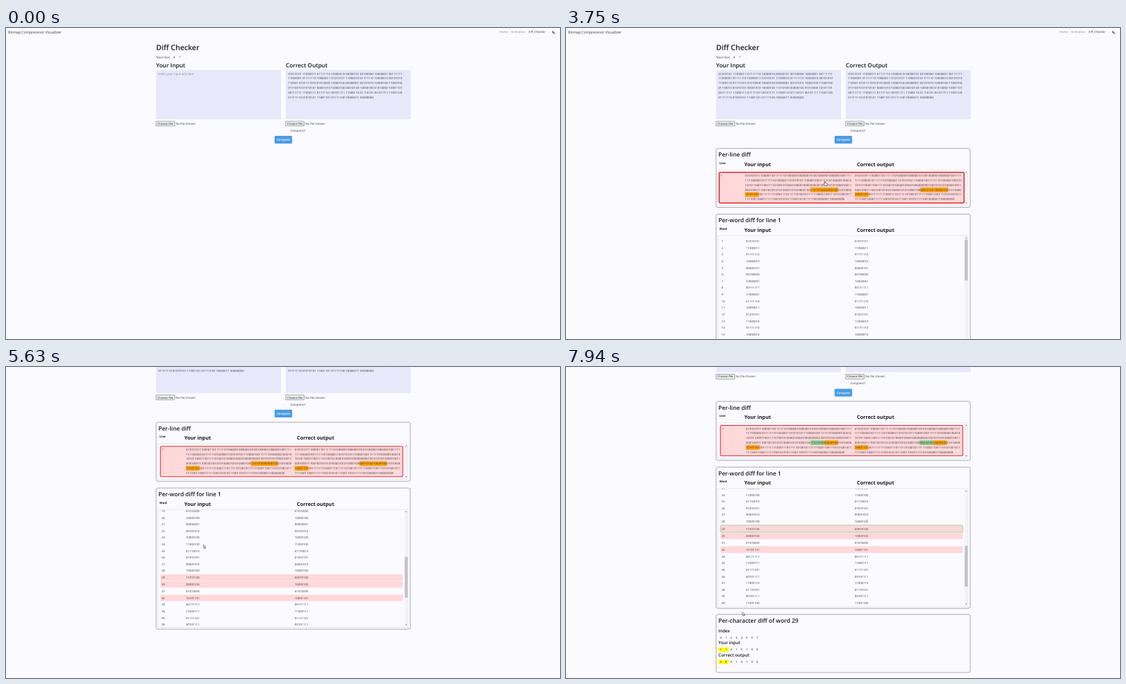
Write an HTML page that moves like this. It is 800 px wide and 450 px high and loops after 8000 ms.

```html
<!DOCTYPE html>
<html lang="en">
<head>
<meta charset="utf-8">
<title>Bitmap Compression Visualizer</title>
<style>
html, body { margin: 0; width: 100%; height: 100%; overflow: hidden; background: #fbfaff; }
svg { display: block; width: 100%; height: 100%; }
text { font-family: "Open Sans", "Noto Sans", sans-serif; text-rendering: geometricPrecision; white-space: pre; }
</style>
</head>
<body>
<pre id="bits" hidden>
01010101 11000011 01111110 10000010 00000101 00100000 10000001 00111111
11000001 01111110 10000011 01010101 11000010 01111110 10000010 00101010
11000110 01111010 01010000 10000100 00000001 00101010 10000100 11000100
01110010 01010101 00001010 10000100 00010100 10000100 01010000 10001101
00111111 11000111 01111101 00101111 11000110 01110101 00101111 11001100
01111110 01010101 11001101 01111100 10000011 00000000
</pre>
<svg id="stage" viewBox="0 0 800 450"></svg>
<script>
const LOOP = 8000;
const SMALL = 4.31;
const LEADING = 6.8;
const ROW = 9.62;
const DIGIT = 0.572 * SMALL;
const PER_LINE = 62;
const PICKED = 28;
const COLUMNS = [216.8, 404];
const CELLS = [259.8, 416.8];
const INK = '#18181d';
const PINK = '#ffd8da';
const ORANGE = '#ffa20c';

const correct = document.getElementById('bits').textContent.trim().split(/\s+/);
const edits = { 28: '11010100', 29: '00000100', 31: '10101101' };
const edited = Object.keys(edits).map(Number);
const input = correct.map((word, i) => edits[i] || word);
const sides = [input, correct];

// Text is placed by its left edge and the middle of its capitals.
const text = (x, mid, str, size = SMALL, { fill = '#3b3b42', weight = 400, anchor = 'start' } = {}) =>
  `<text x="${x}" y="${mid + size * 0.36}" font-size="${size}" fill="${fill}" font-weight="${weight}" text-anchor="${anchor}">${str}</text>`;
const rect = (x, y, w, h, fill, extra = '') =>
  `<rect x="${x}" y="${y}" width="${w}" height="${h}" fill="${fill}" ${extra}/>`;
const group = (id, body, extra = '') => `<g id="${id}" ${extra}>${body}</g>`;
const heading = (x, y, str, size) => text(x, y, str, size, { fill: INK, weight: 600 });
const bold = (x, y, str, size) => text(x, y, str, size, { fill: INK, weight: 700 });
const each = (list, draw) => [...list].map(draw).join('');
const stack = (x, y, lines) => each(lines, (line, i) => text(x, y + i * LEADING, line));

const paragraph = (x, words) => stack(x + 3.2, 66, words.join(' ').match(/.{1,71}(?: |$)/g));

const column = (x, title) =>
  heading(x, 53.8, title, 8.3) +
  rect(x, 60.6, 180.4, 71.4, '#e8e8fa') +
  rect(x, 135, 26.6, LEADING, '#efefef', 'stroke="#77777c" stroke-width=".6"') +
  text(x + 1.8, 138.4, 'Choose File', SMALL, { fill: '#222' }) +
  text(x + 28.3, 138.4, 'No file chosen');

const panel = (y, h, title) =>
  rect(216.8, y, 367, h, 'none', 'rx="2.6" stroke="#737378" stroke-width=".6"') +
  heading(220, y + 9, title, 8.4);

const arrowTick = (y, dir) => `<path d="M576.8 ${y}h2.4l-1.2 ${-1.5 * dir}z" fill="#77777c"/>`;

const tablePanel = (y, h, title, label) => {
  const top = y + 31, bodyHeight = h - 34;
  return panel(y, h, title) +
    bold(221.5, y + 21, label, 4.2) +
    bold(257.6, y + 22.8, 'Your input', 7.3) +
    bold(420, y + 22.8, 'Correct output', 7.3) +
    rect(219.8, top, 360.8, bodyHeight, 'none', 'stroke="#d6d6dc" stroke-width=".5"') +
    rect(575.5, top, 5, bodyHeight, '#f3f3f6') +
    arrowTick(top + 4, 1) + arrowTick(top + bodyHeight - 4, -1);
};

const mark = (x, i) => {
  const line = Math.floor(i * 8 / PER_LINE), start = i * 8 % PER_LINE;
  return rect(x + start * DIGIT, 210.3 + line * LEADING, 8 * DIGIT, LEADING, ORANGE,
    i === PICKED ? 'class="pickedMark"' : '');
};
const bitBlock = (x, words) =>
  each(edited, i => mark(x, i)) +
  stack(x, 213.6, words.join('').match(new RegExp(`.{1,${PER_LINE}}`, 'g')));

const rowTop = i => 303.7 + i * ROW + 0.3 * edited.filter(k => k < i).length;
const wordRow = i => {
  const mid = rowTop(i) + ROW / 2;
  const box = i in edits
    ? rect(223, mid - 4.65, 350, 9.3, PINK, `rx=".8" ${i === PICKED ? 'id="pickedBox"' : ''}`) : '';
  return box + text(224.5, mid, i + 1) + each(sides, (words, s) => text(CELLS[s], mid, words[i]));
};
const rows = (from, to) => each(correct, (_, i) => i >= from && i < to ? wordRow(i) : '');

const charSections = { 'Index': '01234567', 'Your input': input[PICKED], 'Correct output': correct[PICKED] };
const charSection = ([title, chars], n) => {
  const y = 506 + n * 17.7;
  return heading(220, y, title, 6.3) + each(chars, (c, i) => {
    const x = 223.6 + i * 7.5;
    const differs = n > 0 && input[PICKED][i] !== correct[PICKED][i];
    return (differs ? rect(x - 3.75, y + 6.6, 7.6, 6.4, '#ffff14') : '') +
      text(x, y + 9.8, c, 3.9, { anchor: 'middle', weight: 600 });
  });
};

const grey = { fill: '#85858c' };
const page =
  text(3, 6, 'Bitmap Compression Visualizer', 5.35) +
  text(712.8, 5.8, 'Home', SMALL, grey) +
  text(729.3, 5.8, 'Animation', SMALL, grey) +
  text(754.5, 5.8, 'Diff Checker') +
  '<path d="M790.8 3.4a2.3 2.3 0 1 0 2.7 3.2a2 2 0 0 1-2.7-3.2z" fill="#111"/>' +
  heading(216.8, 28, 'Diff Checker', 10.6) +
  text(216.8, 42, 'Word Size') + text(241.5, 42, '8') +
  '<path d="M249.9 41.3l1.3 1.2l1.3-1.2" fill="none" stroke="#444" stroke-width=".6"/>' +
  column(COLUMNS[0], 'Your Input') + column(COLUMNS[1], 'Correct Output') +
  group('focus', rect(216.6, 60.3, 180.8, 72, '#e6eafa', 'rx="1" stroke="#a9c8ee" stroke-width=".9"')) +
  group('hint', text(220, 66, 'Enter your input bits here', SMALL, grey)) +
  group('pasted', paragraph(COLUMNS[0], input)) + paragraph(COLUMNS[1], correct) +
  text(410.5, 148.3, 'Compress?') +
  rect(387.8, 156, 25.4, 11.2, '#4b9de3', 'rx="1.4"') +
  text(400.5, 161.8, 'Compare', SMALL, { fill: '#fff', weight: 600, anchor: 'middle' }) +
  group('linePanel',
    tablePanel(174.2, 85.4, 'Per-line diff', 'Line') +
    group('lineRow',
      rect(223, 209, 350, 44, PINK, 'rx="1.4" id="lineBox"') + text(225, 213.6, '1') +
      each(sides, (words, s) => bitBlock(CELLS[s], words)))) +
  group('wordPanel',
    tablePanel(269.4, 204.2, 'Per-word diff for line 1', 'Word') +
    rect(575.8, 306.3, 4.4, 59, '#c4c4c8', 'id="thumb"') +
    group('clipped', group('rows',
      rows(0, PICKED) + group('rowsAfter', rows(PICKED + 1, correct.length)) +
      group('pickedRow', rows(PICKED, PICKED + 1))), 'clip-path="url(#tableClip)"')) +
  group('charPanel',
    panel(482.5, 84, `Per-character diff of word ${PICKED + 1}`) +
    each(Object.entries(charSections), charSection));

const outline = 'fill="#fff" stroke="#222" stroke-width=".55" stroke-linejoin="round"';
const stage = document.getElementById('stage');
stage.innerHTML =
  `<defs><clipPath id="tableClip">${rect(220, 300.8, 355.4, 168.8, '#000')}</clipPath></defs>` +
  group('page', page) +
  group('cursor',
    `<path id="arrow" d="M0 0v5l1.2-1l.8 1.8l.9-.4l-.8-1.7h1.6z" ${outline}/>` +
    `<path id="hand" d="M-.6 .5q.6-.9 1.1 0v2.2q1.6-.2 2.6 .7v1.8l-.7 1.4h-2.5l-2-2.6q.4-.9 1.5 .1z" ${outline}/>`);

const el = {};
stage.querySelectorAll('[id]').forEach(node => el[node.id] = node);
const pickedMarks = stage.querySelectorAll('.pickedMark');

// A move glides from the current value to its own, beginning at its time.
const glide = (first, moves, duration, t) => moves.reduce((now, [begin, ...goal]) => {
  const p = Math.min(1, Math.max(0, (t - begin) / duration));
  const e = p * p * (3 - 2 * p);
  return now.map((v, i) => v + (goal[i] - v) * e);
}, first);

const pageMoves = [[4150, 71], [4950, 94.3], [6390, 124.5]];
const tableMoves = [[5250, 179], [5740, 220.2]];
const pointerMoves = [
  [300, 300, 110], [1550, 388.4, 165], [2650, 374, 221.5], [3950, 325.2, 264],
  [4660, 201, 262], [5100, 285.2, 257], [5900, 280.5, 265], [6560, 193, 325], [7400, 254.8, 354.5]
];

const show = (node, on) => node.style.display = on ? '' : 'none';
const inside = (x, y, left, top, w, h) => x >= left && x <= left + w && y >= top && y <= top + h;
const place = (node, y, scale = 1, mid = 0) =>
  node.setAttribute('transform', `translate(398 ${mid + y}) scale(${scale}) translate(-398 ${-mid})`);
const set = (node, attributes) =>
  Object.entries(attributes).forEach(([name, value]) => node.setAttribute(name, value));

function draw(t) {
  const [scroll] = glide([0], pageMoves, 260, t);
  const [inner] = glide([0], tableMoves, 260, t);
  const [x, y] = glide([420, 340], pointerMoves, 450, t);
  const compared = t >= 2560, lineOpen = t >= 3500, wordOpen = t >= 6340;
  const grow = wordOpen ? 0.8 : 0;
  const pageY = y + scroll;
  const pickedMid = rowTop(PICKED) + ROW / 2;

  const overInput = inside(x, pageY, 216.8, 60.6, 180.4, 71.4);
  const overButton = inside(x, pageY, 387.8, 156, 25.4, 11.2);
  const overLine = compared && inside(x, pageY, 223, 209, 350, 44);
  const overWord = lineOpen && inside(x, pageY + inner, 223, pickedMid - 5, 350, 10 + 2 * grow);
  const pointing = overButton || overLine || overWord;

  place(el.page, -scroll);
  show(el.focus, t >= 900 && !compared);
  show(el.hint, t < 1300);
  show(el.pasted, t >= 1300);
  show(el.linePanel, compared);
  show(el.wordPanel, lineOpen);
  show(el.charPanel, wordOpen);

  place(el.lineRow, 0, overLine ? 1.01 : 1, 231);
  set(el.lineBox, { stroke: overLine || lineOpen ? '#e02c2c' : 'none', 'stroke-width': overLine ? 1.5 : 1.1 });
  pickedMarks.forEach(node => set(node, { fill: wordOpen ? '#8bcf8b' : ORANGE }));

  place(el.rows, -inner);
  place(el.rowsAfter, 2 * grow);
  place(el.pickedRow, grow, overWord ? 1.008 : 1, pickedMid);
  set(el.thumb, { y: 306.3 + inner * 0.35 });
  set(el.pickedBox, {
    y: pickedMid - 4.65 - grow / 2, height: 9.3 + grow,
    stroke: wordOpen ? '#86cb86' : 'none', 'stroke-width': 0.75
  });

  show(el.cursor, t >= 300 && !overInput);
  show(el.arrow, !pointing);
  show(el.hand, pointing);
  el.cursor.setAttribute('transform', `translate(${x} ${y})`);
}

const start = performance.now();
function tick() {
  draw((performance.now() - start) % LOOP);
  requestAnimationFrame(tick);
}
tick();
</script>
</body>
</html>
```
